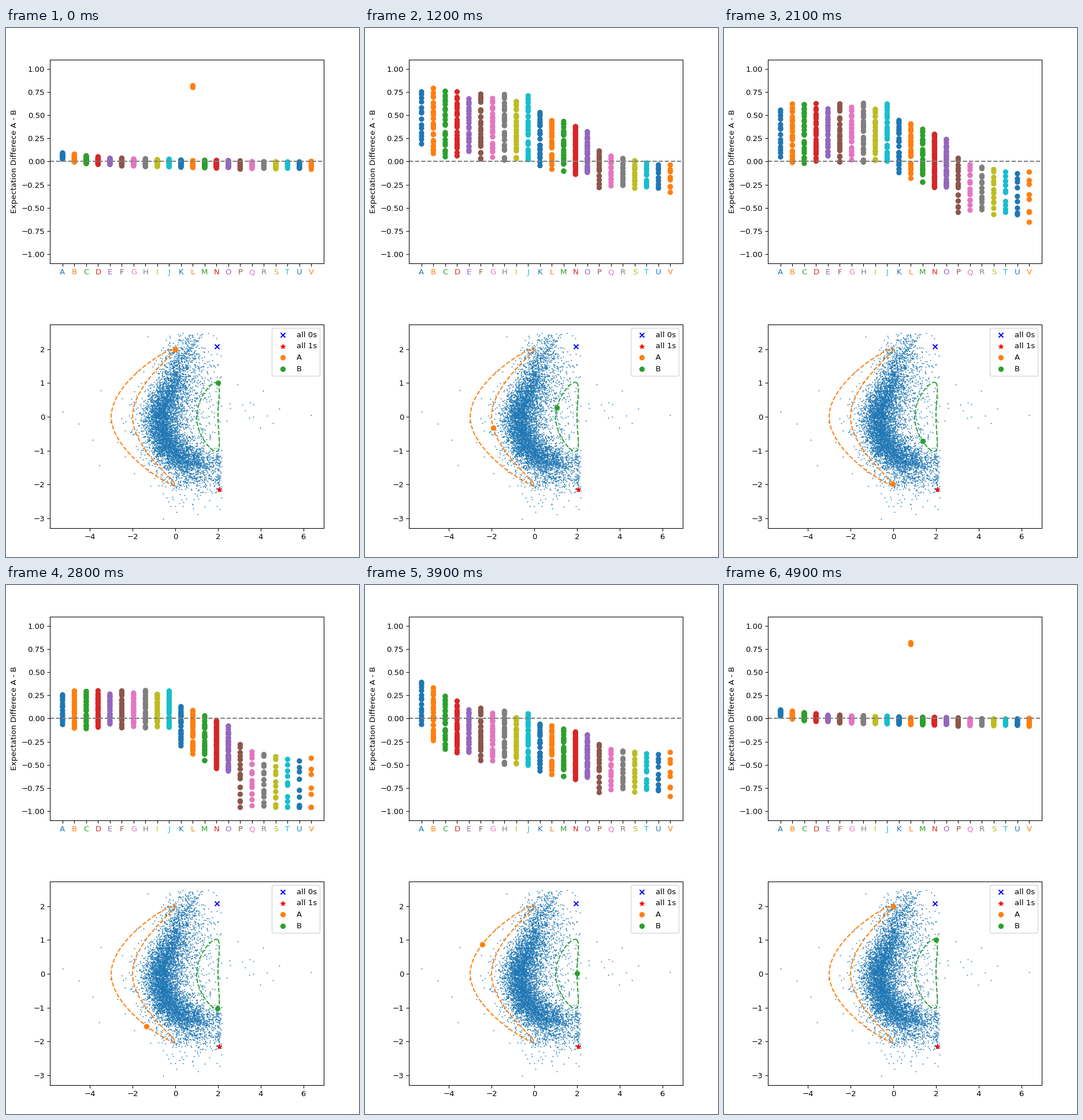
Animation of 611 by 917 pixels, one loop 5 s. Source, as a matplotlib script:

```python
import numpy as np
import matplotlib.pyplot as plt
from matplotlib.animation import FuncAnimation

W, H, DPI = 611, 917, 95.5
FRAMES, INTERVAL = 50, 100
LABELS = "ABCDEFGHIJKLMNOPQRSTUV"
PALETTE = plt.get_cmap("tab10").colors

# Key poses: early labels rise then settle, late labels sink.
KEY_TIMES = np.array([0, 8, 16, 21, 28, 39, 49]) / 49
EARLY_MEAN = [-.02, .18, .45, .31, .10, -.25, -.02]
LATE_MEAN = [-.04, -.08, -.27, -.38, -.78, -.60, -.04]
EARLY_SPREAD = [.04, .28, .33, .30, .19, .27, .04]
LATE_SPREAD = [.04, .07, .20, .25, .33, .22, .04]
FIRST_LIFT = [.08, .22, 0, 0, 0, .42, .08]


def periodic_spline(knots, values):
    """Closed cubic spline; the last value equals the first."""
    values = np.asarray(values, float)
    h = np.diff(knots)
    n = len(h)
    d = np.diff(values, axis=0) / h[:, None]
    system = np.zeros((n, n))
    rhs = np.zeros_like(d)
    for i in range(n):
        system[i, i - 1] += 1 / h[i - 1]
        system[i, i] += 2 / h[i - 1] + 2 / h[i]
        system[i, (i + 1) % n] += 1 / h[i]
        rhs[i] = 3 * (d[i - 1] / h[i - 1] + d[i] / h[i])
    slopes = np.linalg.solve(system, rhs)
    slopes = np.vstack([slopes, slopes[:1]])

    def evaluate(u):
        u = np.atleast_1d(u)
        i = np.clip(np.searchsorted(knots, u, side="right") - 1, 0, n - 1)
        t = ((u - knots[i]) / h[i])[:, None]
        step = h[i][:, None]
        return ((2 * t**3 - 3 * t**2 + 1) * values[i]
                + (t**3 - 2 * t**2 + t) * step * slopes[i]
                + (3 * t**2 - 2 * t**3) * values[i + 1]
                + (t**3 - t**2) * step * slopes[i + 1])
    return evaluate


def closed_path(points):
    points = np.array(points, float)
    length = np.hypot(*np.diff(points, axis=0).T)
    knots = np.r_[0, np.cumsum(length)] / length.sum()
    return periodic_spline(knots, points)


def difference_motion(rng):
    """Column of each dot and a spline giving all heights over the loop."""
    index = np.arange(len(LABELS))
    counts = np.interp(index, [0, 1, 12, 13, 14, 15, 21], [14, 25, 25, 60, 45, 16, 8])
    columns = np.repeat(index, counts.astype(int))
    lateness = np.interp(columns, [0, 9, 10, 14, 15, 21], [0, 0, .2, .5, .8, 1])

    def blend(early, late):
        return np.outer(early, 1 - lateness) + np.outer(late, lateness)

    position = np.concatenate([np.linspace(-1, 1, n) for n in counts.astype(int)])
    position += rng.normal(0, .06, len(columns))
    column_scale = rng.uniform(.85, 1.15, len(LABELS))[columns]
    heights = (blend(EARLY_MEAN, LATE_MEAN)
               + np.outer(FIRST_LIFT, np.exp(-columns / 3))
               + blend(EARLY_SPREAD, LATE_SPREAD) * position * column_scale)

    # One label starts and ends with two dots far above the rest.
    outliers = np.flatnonzero(columns == LABELS.index("L"))[-2:]
    heights[0, outliers] = heights[-1, outliers] = .80, .82
    return columns, periodic_spline(KEY_TIMES, heights)


def crescent(rng, count=5600):
    spine_x = [.55, .15, -.35, -.72, -.75, -.35, .3, 1, 1.75]
    spine_y = [2.2, 1.5, .8, .2, -.4, -.95, -1.25, -1.4, -1.5]
    weights = [.35, .65, 1.1, 1.45, 1.45, 1.3, .75, .35]
    cdf = np.r_[0, np.cumsum(weights)] / sum(weights)
    t = np.interp(rng.random(count), cdf, range(9))
    body = np.c_[np.interp(t, range(9), spine_x) + .36 * rng.standard_t(6, count),
                 np.interp(t, range(9), spine_y) + .27 * rng.standard_t(8, count)]

    fill_y = rng.normal(.3, 1, 1300)
    fill_x = np.interp(fill_y, spine_y[::-1], spine_x[::-1]) + rng.exponential(.75, 1300)
    fill = np.c_[fill_x, fill_y]
    below = np.c_[rng.normal(.6, .7, 130), -1.75 - rng.exponential(.35, 130)]
    edge = np.c_[rng.normal(2.02, .07, 70), rng.uniform(-2.2, -1.1, 70)]
    points = np.vstack([body, fill, below, edge])
    x, y = points.T
    points = points[(x < 2.18) & (x > -3.2) & (y > -2.92) & (y < 2.48)]
    right = np.c_[rng.uniform(2.2, 5.3, 16), rng.normal(.3, .4, 16)]
    extremes = [(-5.28, .15), (-4.52, -.2), (-3.87, -.68), (-3.58, -1.43),
                (-3.5, .78), (6.37, .06), (-.58, -3.01)]
    return np.vstack([points, right, extremes])


def add_axes(fig, top, bottom):
    left, right = .125 * W, .9 * W
    return fig.add_axes([left / W, 1 - bottom / H, (right - left) / W, (bottom - top) / H])


rng = np.random.default_rng(7)
columns, differences = difference_motion(rng)
path_a = closed_path([(0, 2), (-2, 0), (0, -2), (-3, 0), (0, 2)])
path_b = closed_path([(2, 1), (1, 0), (2, -1), (2, 0), (2, 1)])

# The small margin keeps rounding from losing a pixel.
fig = plt.figure(figsize=((W + .01) / DPI, (H + .01) / DPI), dpi=DPI, facecolor="white")

ax = add_axes(fig, 55.0, 407.9)
dots = ax.scatter(columns, np.zeros(len(columns)), c=[PALETTE[j % 10] for j in columns])
ax.axhline(0, color="gray", ls="--")
ax.set_xlim(-1.05, 22.05)
ax.set_ylim(-1.1, 1.1)
ax.set_yticks(np.arange(-4, 5) / 4)
ax.set_xticks(range(len(LABELS)), list(LABELS))
for j, tick in enumerate(ax.get_xticklabels()):
    tick.set_color(PALETTE[j % 10])
ax.set_ylabel("Expectation Differece A - B")

latent = add_axes(fig, 513.7, 866.6)
latent.scatter(*crescent(rng).T, s=1, lw=.35, color="tab:blue")
latent.scatter(1.95, 2.08, marker="x", color="blue", label="all 0s")
latent.scatter(2.06, -2.15, marker="*", color="red", label="all 1s")
marker_a = latent.scatter(0, 2, color="tab:orange", label="A")
marker_b = latent.scatter(2, 1, color="tab:green", label="B")
u = np.linspace(0, 1, 400)
latent.plot(*path_a(u).T, "--", color="tab:orange")
latent.plot(*path_b(u).T, "--", color="tab:green")
latent.set_xlim(-5.862, 6.953)
latent.set_ylim(-3.284, 2.734)
latent.set_xticks(range(-4, 7, 2))
latent.set_yticks(range(-3, 3))
latent.legend(loc="upper right")


def update(frame):
    time = frame / (FRAMES - 1)
    heights = np.clip(differences(time)[0], -.96, .96)
    dots.set_offsets(np.c_[columns, heights])
    marker_a.set_offsets(path_a(time))
    marker_b.set_offsets(path_b(time))
    return dots, marker_a, marker_b


anim = FuncAnimation(fig, update, frames=FRAMES, interval=INTERVAL, repeat=True, repeat_delay=0)
plt.show()
```
